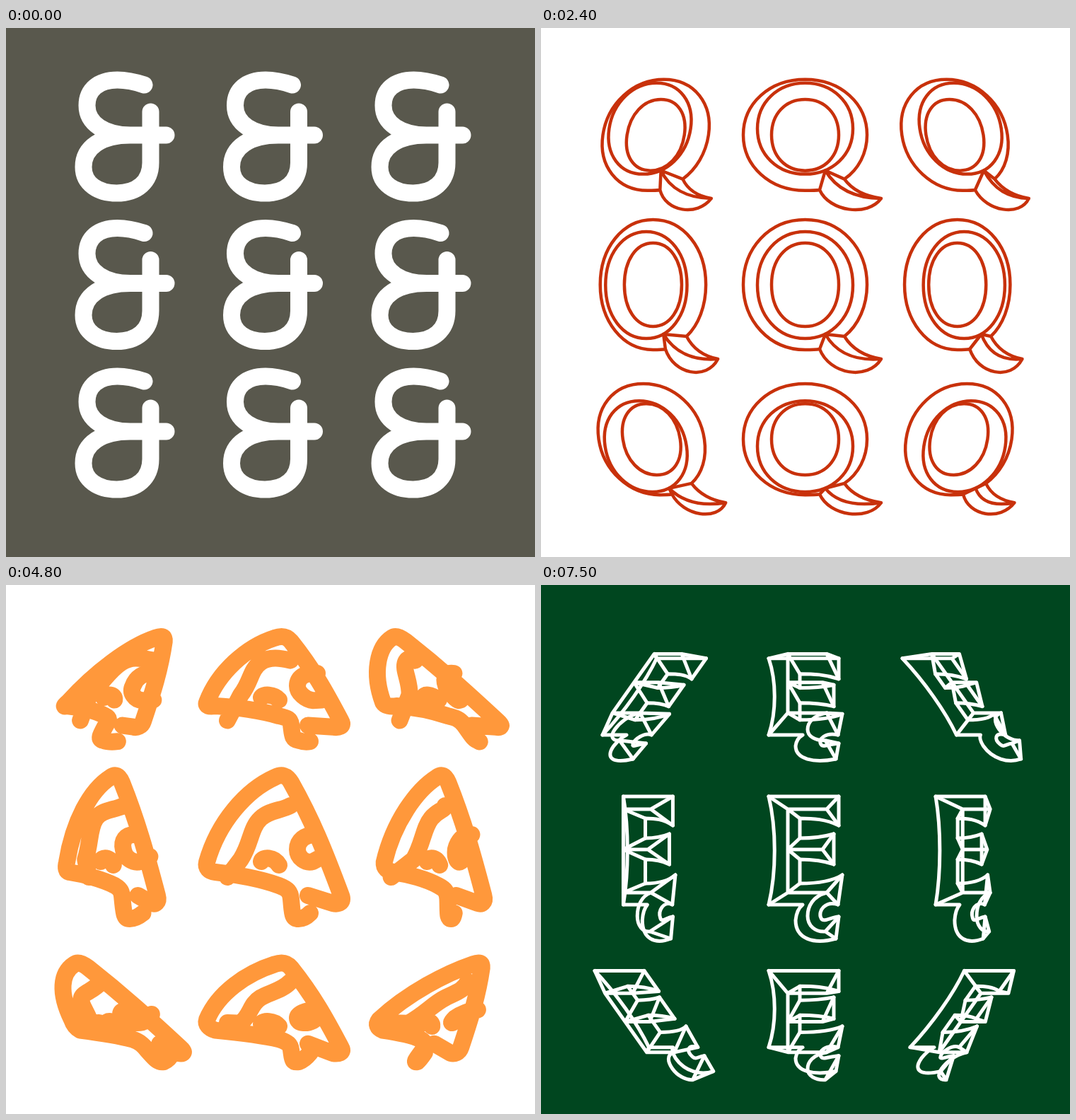
Write an HTML page with a canvas that moves like this. It is 748x748 px and loops after 8000 ms.

```html
<!DOCTYPE html>
<html lang="en">
<head>
<meta charset="utf-8">
<title>Turning glyphs</title>
<style>
  html, body { margin: 0; width: 100%; height: 100%; overflow: hidden; }
  canvas { display: block; width: 748px; height: 748px; }
</style>
</head>
<body>
<canvas id="stage" width="748" height="748"></canvas>
<script>
const ctx = document.getElementById('stage').getContext('2d');

const SIZE = 748, PITCH = 209.5;
const ORIGIN = { x: 374, y: 386.5 };
const SCENE_MS = 1600, HOLD_MS = 560, STEP_MS = 60, STEPS = 10;
const BACK = 16, FRONT = 43;
const COS = Math.SQRT1_2;

// Points are "x,y" or "x,y,z", in the coordinates of the middle cell.
function parse(text, depth = BACK) {
  return text.trim().split(/(?=[MLCZ])/).map(part => ({
    op: part[0],
    pts: part.slice(1).trim().split(/\s+/).filter(Boolean).map(p => {
      const [x, y, z = depth] = p.split(',').map(Number);
      return [x - ORIGIN.x, y - ORIGIN.y, z];
    })
  }));
}

function oval(cx, cy, rx, ry, k = 0.575) {
  const p = (a, b) => `${cx + a * rx},${cy + b * ry}`;
  return `M${p(1, 0)} C${p(1, k)} ${p(k, 1)} ${p(0, 1)} C${p(-k, 1)} ${p(-1, k)} ${p(-1, 0)} ` +
    `C${p(-1, -k)} ${p(-k, -1)} ${p(0, -1)} C${p(k, -1)} ${p(1, -k)} ${p(1, 0)} Z`;
}

const ampersand = [parse(`
  M405,290,22 C390,285 377,283 367,283 C340,283 324,297 324,319 C324,345 350,361 385,361 L436,361
  M385,361 C345,361 319,378 319,406 C319,430 340,443 366,443 C395,443 414,427 414,400 L414,328`, 31)];

const letterQ = [
  parse(`M394,454 C388,455 381,455 373.5,455 C323,455 286,414 286,363 C286,311 323,271 373.5,271
    C424,271 461,311 461,363 C461,393 449,420 429,436 C440,454 457,464 481,468
    C462,499 408,490 394,454 L402,433,43 L429,436
    M402,433,43 C417,459,34 444,471,24 481,468`),
  parse(oval(373.5, 363.5, 67.5, 75.5), FRONT),
  parse(oval(373.5, 363, 47.5, 59, 0.59))
];

const percent = [
  oval(302, 327.5, 53.5, 57) + oval(302, 327.5, 18, 22.5, 0.6),
  'M407,274.5 L444,274.5 L341,452.5 L303,452.5 Z',
  oval(444.5, 399.5, 53.5, 57) + oval(444.5, 399.5, 18, 22.5, 0.6)
].map(s => parse(s, 0));

const pizza = [parse(`
  M427,439,22 L462,450 C470,452 478,449 474,439 C452,380 434,334 403,279 C397,269 390,267 380,272
  C340,290,30 300,335,24 284,392,21 C282,400,22 287,405,25 296,406,28 C325,409,29 362,416,28 386,425,27
  C399,430,28 402,434,29 403,444,29 C405,464,28 404,472,27 414,472,25 C420,472,22 426,468,18 430,464,15
  M402,312,25 C390,319,36 373,318,40 360,330,39 C345,344,38 347,365,36 332,388,32 L313,413,6
  M440,353,40 C422,352,42 412,362,40 412,374,36 C412,386,34 424,394,28 434,391,24 L447,384,18
  M361,391 C363,384 379,384 386,396`, 30)];

const letterE = [
  parse(`M322,299 L421,299 L421,340 C402,331 385,330 366,330 L366,358 C383,358 400,356 414,352
    L414,395 C400,390 383,388 366,388 L366,422 C388,422 410,420 426,410 L420,452
    C402,446 391,461 396,471 C399,478 408,470 421,469 L417,500 C385,509 360,500 360,474
    C361,464 365,456 370,452 L322,452 C333,405 333,345 322,299 Z`),
  parse(`M322,299 L349,317,43 L404,317,43 L421,299 M404,317,43 L421,340
    M366,330 L349,317,43 L349,435,43 L322,452 M366,358 L349,374,43 L366,388
    M414,352 L398,374,43 L414,395 M349,374,43 L398,374,43
    M366,422 L349,435,43 L404,435,43 L426,410 M404,435,43 L420,452`),
  parse(`M404,435 C384,440 377,455 377,468 C377,482 388,491 402,490
    L417,500,16 M402,490 L421,469,16`, FRONT)
];

const scenes = [
  { glyph: ampersand, back: '#59584d', ink: '#fff', width: 24 },
  { glyph: letterQ, back: '#fff', ink: '#c8310b', width: 4.5, flatten: true },
  { glyph: percent, back: '#03a17e', ink: '#fff', solid: true },
  { glyph: pizza, back: '#fff', ink: '#ff983b', width: 24, flatten: true },
  { glyph: letterE, back: '#00461f', ink: '#fff', width: 5 }
];

// Blend between the flat pose and a 45 degree turn on each axis.
function projector(col, row, amount) {
  const u = col * amount, v = row * amount;
  const sx = 1 - (1 - COS) * Math.abs(u);
  const sy = 1 - (1 - COS) * Math.abs(v);
  const cx = ORIGIN.x + col * PITCH, cy = ORIGIN.y + row * PITCH;
  return ([x, y, z], lift) => [
    cx + x * sx - 0.5 * u * v * y + COS * u * sy * (z + lift),
    cy + y * sy + COS * v * (z + lift)
  ];
}

function trace(path, project, lift = 0) {
  ctx.beginPath();
  for (const { op, pts } of path) {
    const flat = pts.map(p => project(p, lift));
    if (op === 'M') ctx.moveTo(...flat[0]);
    else if (op === 'L') ctx.lineTo(...flat[0]);
    else if (op === 'C') ctx.bezierCurveTo(...flat.flat());
    else ctx.closePath();
  }
}

function drawGlyph(scene, project) {
  for (const path of scene.glyph) {
    if (scene.solid) {
      for (let lift = BACK; lift <= 36; lift += 2) {
        trace(path, project, lift);
        ctx.fill('evenodd');
      }
    } else {
      trace(path, project);
      ctx.stroke();
    }
  }
}

function draw(ms) {
  const scene = scenes[Math.floor(ms / SCENE_MS)];
  const local = ms % SCENE_MS;
  const step = Math.floor((local - HOLD_MS) / STEP_MS) + 1;
  const progress = Math.max(0, Math.min(STEPS, step)) / STEPS;
  const amount = scene.flatten ? 1 - progress : progress;

  ctx.fillStyle = scene.back;
  ctx.fillRect(0, 0, SIZE, SIZE);
  ctx.fillStyle = ctx.strokeStyle = scene.ink;
  ctx.lineWidth = scene.width || 1;
  ctx.lineCap = ctx.lineJoin = 'round';
  for (let row = -1; row <= 1; row++) {
    for (let col = -1; col <= 1; col++) drawGlyph(scene, projector(col, row, amount));
  }
}

const start = performance.now();
function tick() {
  draw((performance.now() - start) % (SCENE_MS * scenes.length));
  requestAnimationFrame(tick);
}
tick();
</script>
</body>
</html>
```
